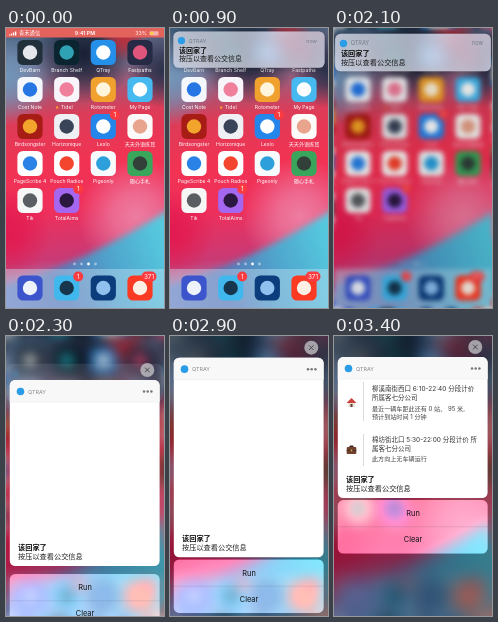
Recreate the animation shown at these times as an HTML page with a canvas. Size 158x280 px, loop 3500 ms.

```html
<!DOCTYPE html>
<html lang="zh">
<head>
<meta charset="utf-8">
<style>
html, body { margin: 0; width: 100%; height: 100%; overflow: hidden; background: #34454f; }
canvas { display: block; width: 158px; height: 280px; }
</style>
</head>
<body>
<canvas id="stage"></canvas>
<script>
const W = 158, H = 280, LOOP = 3500, STEP = 100, PAD = 32;
const FONT = 'Inter, "Noto Sans CJK SC", "Noto Sans CJK", sans-serif';
const COLS = [24, 60.7, 97.3, 134];
const ROW_TOP = 24.5, ROW_PITCH = 37;

const canvas = document.getElementById('stage');
const scale = window.devicePixelRatio || 1;
canvas.width = W * scale;
canvas.height = H * scale;
const stage = canvas.getContext('2d');

// label, tile colour, mark colour, badge
const apps = [
  ['DevBarn', '#22303c', '#e4e8ec'], ['Branch Shelf', '#0b2530', '#2fa3b4'],
  ['QTray', '#2590ea', '#ffffff'], ['Fastpaths', '#262a44', '#e0557c'],
  ['Cost Note', '#f4f8fd', '#2676e4'], ['Tidel', '#f7f5fa', '#ef7f9b'],
  ['Rotometer', '#f0a12e', '#fff4dc'], ['My Page', '#45b9f0', '#ffffff'],
  ['Birdsongster', '#a81c16', '#f2a42c'], ['Horizonique', '#eef0f3', '#3a4458'],
  ['Lexlo', '#2386ea', '#ffffff', '1'], ['天天外语练耳', '#fbfaf8', '#e8a48c'],
  ['PageScribe 4', '#ffffff', '#2b82e6'], ['Pouch Radios', '#ffffff', '#f4452f'],
  ['Pigeonly', '#f6fafc', '#2da0dc'], ['随心手札', '#3aa65c', '#33403a'],
  ['Tik', '#f6f6f6', '#5a5e62'], ['TotalAims', '#a567f0', '#2a1840', '1']
];
const dock = [
  ['', '#3c55cc', '#eef3fb'], ['', '#40b8ee', '#17364e', '1'],
  ['', '#0b3c7c', '#8fc0ee'], ['', '#fb3a24', '#fff0e6', '371']
];

function key(t, ...points) {
  if (t <= points[0][0]) return points[0][1];
  for (let i = 1; i < points.length; i++) {
    const [a, va] = points[i - 1], [b, vb] = points[i];
    if (t <= b) return va + (vb - va) * (t - a) / (b - a);
  }
  return points[points.length - 1][1];
}

function text(c, str, x, y, size, color, align = 'left', weight = 400) {
  c.font = `${weight} ${size}px ${FONT}`;
  c.textAlign = align;
  c.textBaseline = 'middle';
  c.fillStyle = color;
  c.fillText(str, x, y);
}

function box(c, x, y, w, h, r, color) {
  c.beginPath();
  c.roundRect(x, y, w, h, r);
  c.fillStyle = color;
  c.fill();
}

function disc(c, x, y, r, color) {
  c.beginPath();
  c.arc(x, y, r, 0, Math.PI * 2);
  c.fillStyle = color;
  c.fill();
}

function line(c, x1, y1, x2, y2, color, width) {
  c.beginPath();
  c.moveTo(x1, y1);
  c.lineTo(x2, y2);
  c.strokeStyle = color;
  c.lineWidth = width;
  c.stroke();
}

function gradient(c, x1, y1, x2, y2, colors) {
  const g = c.createLinearGradient(x1, y1, x2, y2);
  colors.forEach((color, i) => g.addColorStop(i / (colors.length - 1), color));
  return g;
}

function glow(c, x, y, r, rgb) {
  const g = c.createRadialGradient(x, y, 0, x, y, r);
  g.addColorStop(0, `rgba(${rgb},.95)`);
  g.addColorStop(.4, `rgba(${rgb},.7)`);
  g.addColorStop(1, `rgba(${rgb},0)`);
  c.fillStyle = g;
  c.fillRect(0, 0, W, H);
}

function wallpaper(c) {
  c.fillStyle = gradient(c, 0, 0, 30, H,
    ['#3d5f7c', '#7a6d8c', '#dc3c58', '#f23353', '#ee2f5c', '#c93a74', '#8fa6d0']);
  c.fillRect(0, 0, W, H);
  glow(c, 0, 50, 48, '112,152,188');
  glow(c, 78, 26, 50, '20,28,48');
  glow(c, 158, 42, 38, '36,46,72');
  glow(c, 118, 10, 24, '196,44,58');
  glow(c, 130, 188, 58, '238,128,164');
  glow(c, 0, 205, 45, '226,24,78');
  // cool sweep across the lower right
  c.save();
  c.filter = `blur(${3 * scale}px)`;
  c.beginPath();
  c.moveTo(-20, 262);
  c.quadraticCurveTo(80, 238, 180, 170);
  c.lineTo(180, 300);
  c.lineTo(-20, 300);
  c.fillStyle = gradient(c, 0, 270, W, 215, ['#6a7cc0', '#5872b4', '#4fa4cc', '#55c8de']);
  c.fill();
  c.restore();
}

function icon(c, [label, tile, mark, badge], x, y) {
  box(c, x - 12.6, y - 12.6, 25.2, 25.2, 5.7, tile);
  disc(c, x, y, 7.2, mark);
  if (label) text(c, label, x, y + 18, 5.1, '#fff', 'center');
  if (label === 'Tidel') disc(c, x - 9.5, y + 18, 1.2, '#f5a02c');
  if (badge) {
    const w = badge.length > 1 ? 15 : 10;
    box(c, x + 16.5 - w, y - 16.5, w, 10, 5, '#fb3b3f');
    text(c, badge, x + 16.5 - w / 2, y - 11.3, 6.4, '#fff', 'center');
  }
}

function home(c) {
  wallpaper(c);
  apps.forEach((app, i) => icon(c, app, COLS[i % 4], ROW_TOP + ROW_PITCH * Math.floor(i / 4)));
  for (let i = 0; i < 4; i++) disc(c, 68.5 + i * 7, 236, 1.4, i === 2 ? '#fff' : 'rgba(255,255,255,.45)');
  c.fillStyle = 'rgba(206,230,246,.4)';
  c.fillRect(0, 241, W, 39);
  dock.forEach((app, i) => icon(c, app, COLS[i], 260));
}

function statusBar(c) {
  c.fillStyle = '#e4625c';
  c.fillRect(0, 0, W, 9.5);
  c.fillStyle = '#fff';
  for (let i = 0; i < 4; i++) c.fillRect(3 + i * 2, 6.5 - i, 1.3, 1 + i);
  text(c, '青禾通信', 13, 5.4, 5.3, '#fff');
  text(c, '9:41 PM', 79, 5.4, 5.3, '#fff', 'center', 600);
  text(c, '33%', 141, 5.4, 5.3, '#fff', 'right');
  box(c, 143.5, 3.2, 9, 4.4, 1, 'rgba(255,255,255,.5)');
  box(c, 144, 3.7, 3.2, 3.4, .6, '#fbc94c');
}

// Home screen with stretched margins, so that blurring keeps solid edges.
const padded = document.createElement('canvas');
padded.width = W + PAD * 2;
padded.height = H + PAD * 2;

function preparePadded() {
  const flat = document.createElement('canvas');
  flat.width = W;
  flat.height = H;
  home(flat.getContext('2d'));
  const c = padded.getContext('2d');
  c.drawImage(flat, 0, 0, padded.width, padded.height);
  c.drawImage(flat, PAD, PAD);
}

function blurredHome(c, radius, saturation, brightness) {
  c.filter = `blur(${radius * scale}px) saturate(${saturation}) brightness(${brightness})`;
  c.drawImage(padded, -PAD, -PAD);
  c.filter = 'none';
}

function banner(c, y, zoom, alpha) {
  c.save();
  c.globalAlpha = alpha;
  c.translate(79, y + 21.7);
  c.scale(zoom, zoom);
  c.translate(-79, -21.7);
  c.shadowColor = 'rgba(0,0,0,.35)';
  c.shadowBlur = 7 * scale;
  box(c, 3.4, 3.4, 151.2, 36.4, 5.5, '#d6d6e0');
  c.shadowColor = 'transparent';
  c.save();
  c.clip();
  c.globalAlpha = alpha * .25;
  blurredHome(c, 9, 1.2, 1.1);
  c.restore();
  disc(c, 11.5, 12.7, 3.6, '#2b9ce8');
  text(c, 'QTRAY', 18.5, 13, 5.4, '#747b88');
  text(c, 'now', 147, 13, 5.4, '#747b88', 'right');
  text(c, '该回家了', 9, 22.6, 7, '#111', 'left', 700);
  text(c, '按压以查看公交信息', 9, 31.2, 7, '#181818');
  c.restore();
}

function house(c, x, y) {
  box(c, x - 3.3, y - 1, 6.6, 5, .4, '#e7dfd2');
  c.beginPath();
  c.moveTo(x - 5, y);
  c.lineTo(x, y - 5);
  c.lineTo(x + 5, y);
  c.fillStyle = '#c9403c';
  c.fill();
  c.fillStyle = '#5c4038';
  c.fillRect(x - 1, y + 1, 2, 3);
}

function briefcase(c, x, y) {
  box(c, x - 2, y - 4.6, 4, 3, .8, '#3f2a22');
  box(c, x - 4.8, y - 3, 9.6, 7, 1, '#70402c');
  c.fillStyle = '#3f2a22';
  c.fillRect(x - 4.8, y, 9.6, .8);
  c.fillStyle = '#dcb65a';
  c.fillRect(x - .8, y - .4, 1.6, 1.6);
}

function busInfo(c, top, alpha) {
  c.save();
  c.globalAlpha *= alpha;
  c.translate(0, top);
  house(c, 17.5, 46);
  briefcase(c, 17.5, 93);
  line(c, 29.5, 25, 29.5, 64, '#c9c9c9', .7);
  line(c, 29.5, 77, 29.5, 109, '#c9c9c9', .7);
  text(c, '柳溪南街西口 6:10-22:40 分段计价', 38, 32, 6.5, '#333');
  text(c, '所属客七分公司', 38, 41, 6.5, '#333');
  text(c, '最近一辆车距此还有 0 站、 95 米,', 38, 52, 6.1, '#444');
  text(c, '预计到站时间 1 分钟', 38, 59.8, 6.1, '#444');
  text(c, '棉坊街北口 5:30-22:00 分段计价 所', 38, 83, 6.5, '#333');
  text(c, '属客七分公司', 38, 92, 6.5, '#333');
  text(c, '此方向上无车辆运行', 38, 102.5, 6.1, '#444');
  c.restore();
}

function card(c, top, bottom, infoAlpha) {
  box(c, 3.8, top, 149.8, bottom - top, 5.5, '#fff');
  box(c, 3.8, top, 149.8, 22, [5.5, 5.5, 0, 0], '#f8f8f9');
  line(c, 3.8, top + 22, 153.6, top + 22, '#e4e4e6', .5);
  disc(c, 14.5, top + 11.5, 3.8, '#2b9ce8');
  text(c, 'QTRAY', 22, top + 12, 5.4, '#85888c');
  for (let i = 0; i < 3; i++) disc(c, 138 + i * 3.7, top + 11.5, 1.25, '#74767a');
  if (infoAlpha) busInfo(c, top, infoAlpha);
  text(c, '该回家了', 12, bottom - 18, 7.2, '#111', 'left', 700);
  text(c, '按压以查看公交信息', 12, bottom - 9.3, 7.2, '#222');
}

function actions(c, top) {
  c.save();
  c.beginPath();
  c.roundRect(3.8, top, 149.8, 53.5, 5.5);
  c.clip();
  blurredHome(c, 7, 1.5, 1.05);
  c.fillStyle = 'rgba(255,255,255,.42)';
  c.fillRect(0, top, W, 54);
  line(c, 0, top + 26.8, W, top + 26.8, 'rgba(60,60,80,.25)', .5);
  c.restore();
  text(c, 'Run', 79, top + 14, 7.4, '#111', 'center');
  text(c, 'Clear', 79, top + 40, 7.4, '#111', 'center');
}

function closeButton(c, y) {
  disc(c, 141.3, y, 7, 'rgba(205,205,208,.72)');
  line(c, 139, y - 2.3, 143.6, y + 2.3, '#4b4d50', 1);
  line(c, 139, y + 2.3, 143.6, y - 2.3, '#4b4d50', 1);
}

function expanded(c, t) {
  // distance left to the resting place, 1 at 2300 ms
  const rest = Math.exp((2300 - t) / 170);
  const collapse = key(t, [3000, 0], [3100, .16], [3200, .56], [3300, .88], [3400, 1]);
  const top = 21 + 23 * rest;
  const bottom = 221 + 9 * rest - 59 * collapse;
  c.save();
  c.globalAlpha = key(t, [2100, 0], [2200, .6], [2300, 1]);
  actions(c, bottom + 2 + 6 * rest);
  card(c, top, bottom, key(t, [3000, 0], [3200, 1]));
  closeButton(c, top - 10);
  c.restore();
}

// Critically damped slide from above the screen, 1 when at rest.
function slideIn(t) {
  const s = Math.max(0, (t - 410) / 88);
  return t >= 900 ? 1 : 1 - (1 + s) * Math.exp(-s);
}

function draw(t) {
  const c = stage;
  c.setTransform(scale, 0, 0, scale, 0, 0);
  const blur = key(t, [1900, 0], [2300, 5.5], [2500, 8], [2900, 9]);
  if (blur > 0) {
    blurredHome(c, blur, 1.05, key(t, [1900, 1], [2300, .78], [2500, .68], [2900, .65]));
  } else {
    home(c);
    if (t < 500) statusBar(c);
  }
  if (t >= 400 && t < 2400) {
    const y = 41 * (slideIn(t) - 1) + key(t, [2000, 0], [2100, 3], [2300, 25]);
    const zoom = key(t, [1900, 1], [2100, 1.03]);
    banner(c, y, zoom, key(t, [2100, 1], [2200, .45], [2300, .12]));
  }
  if (t >= 2200) expanded(c, t);
}

function tick(now) {
  draw(Math.floor((now - start) % LOOP / STEP) * STEP);
  requestAnimationFrame(tick);
}

preparePadded();
const start = performance.now();
draw(0);
requestAnimationFrame(() => tick(performance.now()));
</script>
</body>
</html>
```
